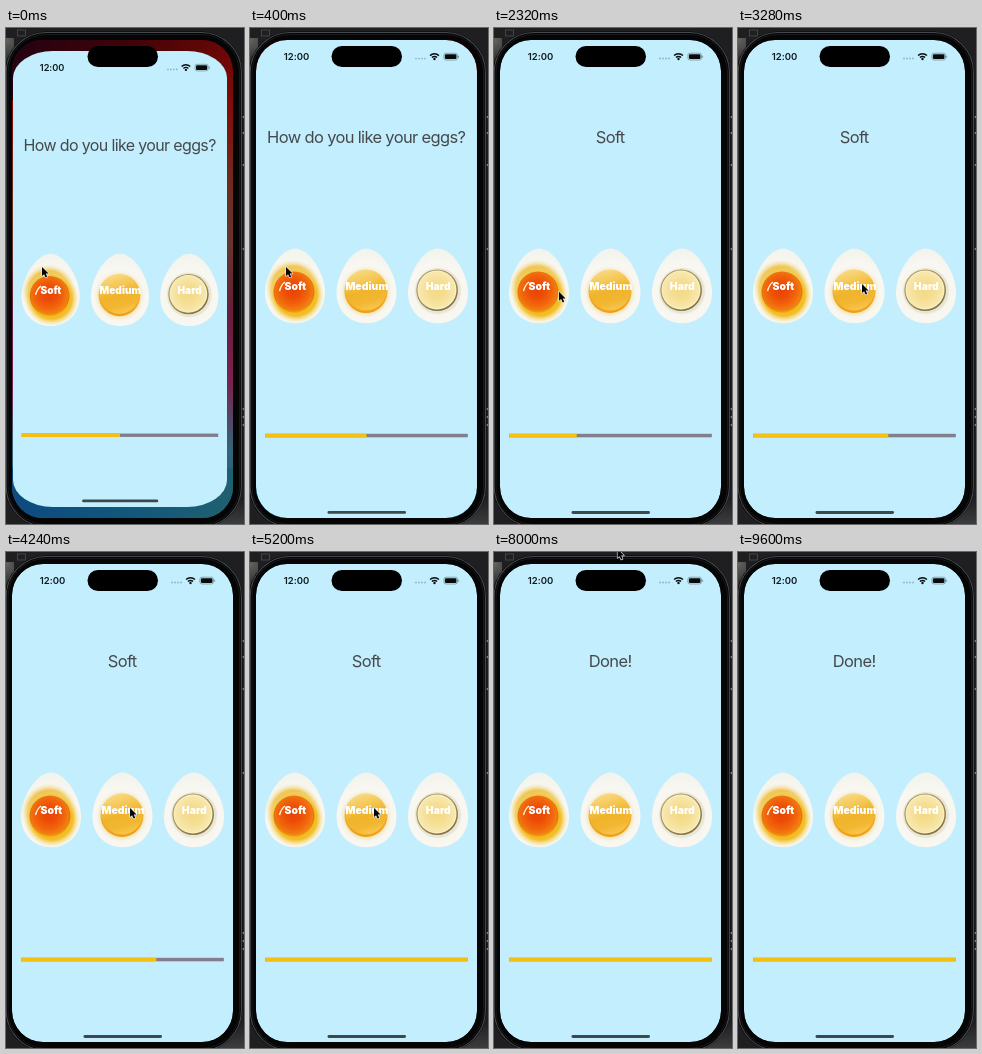
These frames come from a looping animation (238x496 px, 9.68 s). An HTML page with a canvas:

```html
<!DOCTYPE html>
<html lang="en">
<head>
<meta charset="utf-8">
<title>Egg timer</title>
<style>
html, body { margin: 0; width: 100%; height: 100%; overflow: hidden; background: #1d1d1f; }
canvas { display: block; width: 238px; height: 496px; }
</style>
</head>
<body>
<canvas id="stage"></canvas>
<script>
const W = 238, H = 496, LOOP = 9680, STEP = 80;
const TAP = 1250, SECONDS = 3;
const canvas = document.getElementById('stage');
const ctx = canvas.getContext('2d');
const dpr = window.devicePixelRatio || 1;
canvas.width = W * dpr;
canvas.height = H * dpr;

const lerp = (a, b, p) => a + (b - a) * p;
const clamp = v => Math.max(0, Math.min(1, v));
const smooth = p => p * p * (3 - 2 * p);

function roundRect(x, y, w, h, r) {
  ctx.beginPath();
  ctx.roundRect(x, y, w, h, r);
}

function fillRound(x, y, w, h, r, color) {
  roundRect(x, y, w, h, r);
  ctx.fillStyle = color;
  ctx.fill();
}

function disc(x, y, r, fill) {
  ctx.beginPath();
  ctx.arc(x, y, r, 0, Math.PI * 2);
  ctx.fillStyle = fill;
  ctx.fill();
}

function gradient(g, colors) {
  colors.forEach((c, i) => g.addColorStop(i / (colors.length - 1), c));
  return g;
}

const radial = (x, y, r, ...colors) =>
  gradient(ctx.createRadialGradient(x, y, 0, x, y, r), colors);
const linear = (x0, y0, x1, y1, ...colors) =>
  gradient(ctx.createLinearGradient(x0, y0, x1, y1), colors);

function text(str, x, y, size, weight, color, spacing = 0) {
  ctx.font = `${weight} ${size}px Inter, sans-serif`;
  ctx.letterSpacing = spacing + 'px';
  ctx.textAlign = 'center';
  ctx.fillStyle = color;
  ctx.fillText(str, x + spacing / 2, y);
}

function drawPhone() {
  ctx.fillStyle = '#1f1f21';
  ctx.fillRect(0, 0, W, H);
  ctx.fillStyle = radial(0, 12, 40, '#63645f', '#2f302f', '#1f1f21');
  ctx.fillRect(0, 10, 8, 40);
  ctx.fillStyle = linear(0, 470, 0, 496, '#1f1f21', '#3b3c3e');
  ctx.fillRect(190, 470, 48, 26);
  ctx.strokeStyle = '#4a4c4e';
  ctx.lineWidth = 0.8;
  ctx.strokeRect(11.5, 2, 8, 6);
  ctx.fillStyle = '#77797c';
  for (const y of [88, 104, 136, 220, 380, 388, 396]) ctx.fillRect(236.5, y, 1.5, 2);

  fillRound(-1, 3.5, 237.3, 496, 41, '#050506');
  roundRect(0.2, 4.5, 235.2, 494, 40);
  ctx.strokeStyle = '#45484c';
  ctx.lineWidth = 1.1;
  ctx.stroke();
  roundRect(2, 6.5, 231.5, 490, 38);
  ctx.strokeStyle = '#17181a';
  ctx.lineWidth = 1;
  ctx.stroke();
}

function drawWallpaper() {
  ctx.fillStyle = linear(0, 12, 0, 490, '#6a0606', '#830c08', '#70291c', '#66352c', '#671d3c', '#7c2150', '#35647a', '#1b5a72');
  ctx.fillRect(6, 12, 221, 478);
  ctx.fillStyle = linear(6, 0, 227, 0, 'rgba(18,0,22,.8)', 'rgba(18,0,14,.5)', 'rgba(18,0,10,0)');
  ctx.fillRect(6, 12, 221, 60);
  ctx.fillStyle = linear(6, 0, 227, 0, '#0d4a80', '#12577c', '#1f6070');
  ctx.fillRect(6, 440, 221, 50);
}

function drawStatus() {
  text('12:00', 46.5, 32, 9.5, 600, '#10191d', -0.05);
  for (let i = 0; i < 4; i++) disc(166 + i * 3, 30.5, 0.9, '#92b3bf');
  ctx.strokeStyle = '#0b1012';
  ctx.lineWidth = 1.5;
  for (const r of [3.6, 6.3]) {
    ctx.beginPath();
    ctx.arc(184.5, 32, r, -Math.PI * 0.75, -Math.PI * 0.25);
    ctx.stroke();
  }
  disc(184.5, 31, 1.2, '#0b1012');
  roundRect(193.9, 25.2, 13.6, 6.8, 2.1);
  ctx.strokeStyle = '#6d868f';
  ctx.lineWidth = 0.7;
  ctx.stroke();
  fillRound(194.9, 26.2, 11.6, 4.8, 1.3, '#080b0c');
  fillRound(208.2, 27.5, 0.9, 2.3, 0.5, '#6d868f');
}

function eggPath() {
  ctx.beginPath();
  ctx.moveTo(0, -37.5);
  ctx.bezierCurveTo(15, -37.5, 30, -12, 30, 6.5);
  ctx.bezierCurveTo(30, 25, 17, 37.2, 0, 37.2);
  ctx.bezierCurveTo(-17, 37.2, -30, 25, -30, 6.5);
  ctx.bezierCurveTo(-30, -12, -15, -37.5, 0, -37.5);
}

function softYolk() {
  disc(-2, 1, 28, radial(-2, 1, 28, '#efbc35', '#efbc35', '#efbc35', '#efc95c', 'rgba(246,238,205,0)'));
  disc(1, 9, 28, radial(1, 9, 28, '#f2b512', '#f2b512', '#f2b512', '#f2c02c', 'rgba(246,228,150,0)'));
  disc(-1, 6, 20.5, linear(0, -14, 0, 26, '#dd7a20', '#d9720f', '#ed9a0c'));
  disc(-1, 5.5, 19.5, radial(-2, 4, 23, '#e94406', '#ec4d07', '#f1660b', '#f68a18'));
  ctx.beginPath();
  ctx.moveTo(-15.5, 5);
  ctx.quadraticCurveTo(-14, -1, -10, -4);
  ctx.strokeStyle = '#fff2d8';
  ctx.lineWidth = 1.4;
  ctx.stroke();
}

function mediumYolk() {
  disc(-0.5, 6, 26, radial(-0.5, 6, 26, '#f5cf69', '#f5cf69', '#f5cf69', '#f5d888', 'rgba(246,240,215,0)'));
  disc(-0.5, 5.5, 21.5, linear(0, -16, 0, 27, '#f3cf75', '#efb23a', '#f09d15'));
  disc(-0.5, 4, 20.5, linear(-6, -16, 6, 25, '#f8d983', '#f5c958', '#f0b32c', '#f2b630', '#f8c954'));
}

function hardYolk() {
  disc(0, 5, 23, 'rgba(222,217,198,.55)');
  disc(-0.8, 4.3, 20.8, linear(-14, -12, 12, 24, '#a7955c', '#a08e54', '#7d6e3d'));
  disc(-1, 4, 19.5, '#fbf0c4');
  disc(-1.2, 4, 18.5, radial(-1, 4, 19, '#f3d985', '#f5de93', '#f8e9b2'));
}

const EGGS = [
  { label: 'Soft', x: 45, yolk: softYolk },
  { label: 'Medium', x: 116.5, yolk: mediumYolk },
  { label: 'Hard', x: 188, yolk: hardYolk },
];

function drawEgg({ label, x, yolk }) {
  ctx.save();
  ctx.translate(x, 258);
  eggPath();
  ctx.fillStyle = radial(0, 6, 44, '#f4f2e8', '#f5f3ea', '#f8f7f1', '#f1f3ec');
  ctx.fill();
  ctx.clip();
  yolk();
  ctx.restore();
  text(label, x + 0.3, 262, 10.4, 900, '#fff', 0.05);
}

function drawBar(value) {
  ctx.fillStyle = '#827f8c';
  ctx.fillRect(15.2, 405.8, 202.6, 3.5);
  ctx.fillStyle = '#f6c013';
  ctx.fillRect(15.2, 405.8, 202.6 * value, 3.5);
}

// Shrinks about the left margin while the app window is still opening.
function shrunk(open, pivotY, dy, draw) {
  const k = 1 - open, s = 1 - 0.03 * k;
  ctx.save();
  ctx.translate(15 + 0.5 * k, pivotY + dy * k);
  ctx.scale(s, s);
  ctx.translate(-15, -pivotY);
  draw();
  ctx.restore();
}

function timerState(t) {
  if (t < TAP) return { title: 'How do you like your eggs?', value: 0.5 };
  const ticks = Math.floor((t - TAP) / 1000);
  return { title: ticks > SECONDS ? 'Done!' : 'Soft', value: Math.min(1, ticks / SECONDS) };
}

function drawApp(t) {
  const open = 1 - Math.pow(1 - clamp(t / 480), 3);
  const { title, value } = timerState(t);
  ctx.save();
  roundRect(6, 12, 221, 478, 31);
  ctx.clip();
  if (open < 1) drawWallpaper();
  const x = lerp(7, 6, open), y = lerp(23, 12, open);
  const right = lerp(221, 227, open), bottom = lerp(479, 490, open);
  const corner = { x: lerp(40, 31, open), y: lerp(27, 31, open) };
  fillRound(x, y, right - x, bottom - y, corner, '#c3eefd');
  shrunk(open, 28, 11, drawStatus);
  shrunk(open, 109, 8.5, () => text(title, 116.5, 114.8, 16.5, 400, '#45494c', -0.66));
  shrunk(open, 258, 4, () => EGGS.forEach(drawEgg));
  shrunk(open, 407.5, -0.3, () => drawBar(value));
  shrunk(open, 484.5, -11.5, () => fillRound(77.5, 483, 78.5, 2.9, 1.4, '#3e474b'));
  ctx.restore();
  fillRound(81.5, 18, 70.5, 21, 10.5, '#000');
}

// Pointer moves: start, end, from x, y, to x, y.
const MOVES = [
  [560, 1100, 36, 239, 41, 267],
  [2000, 2900, 41, 267, 124, 256],
];

function pointerAt(t) {
  if (t >= 7900 && t < 8150) return [123.5, -3];
  if (t >= 5600) return null;
  const move = MOVES.find(m => t < m[1]) || MOVES[MOVES.length - 1];
  const [start, end, x0, y0, x1, y1] = move;
  const p = smooth(clamp((t - start) / (end - start)));
  return [lerp(x0, x1, p), lerp(y0, y1, p)];
}

function drawPointer(t) {
  const at = pointerAt(t);
  if (!at) return;
  ctx.save();
  ctx.translate(...at);
  ctx.scale(0.9, 0.9);
  ctx.beginPath();
  ctx.moveTo(0, 0);
  for (const [x, y] of [[0, 10], [2.3, 8], [4, 11.8], [5.8, 11], [4.2, 7.3], [7.3, 7.3]]) ctx.lineTo(x, y);
  ctx.closePath();
  ctx.lineJoin = 'round';
  ctx.lineWidth = 1.3;
  ctx.strokeStyle = '#eef6f8';
  ctx.stroke();
  ctx.fillStyle = '#050505';
  ctx.fill();
  ctx.restore();
}

function render(t) {
  ctx.setTransform(dpr, 0, 0, dpr, 0, 0);
  drawPhone();
  drawApp(t);
  drawPointer(t);
}

const begin = performance.now();
function loop() {
  const t = (performance.now() - begin) % LOOP;
  render(Math.floor(t / STEP) * STEP);
  requestAnimationFrame(loop);
}
loop();
</script>
</body>
</html>
```
